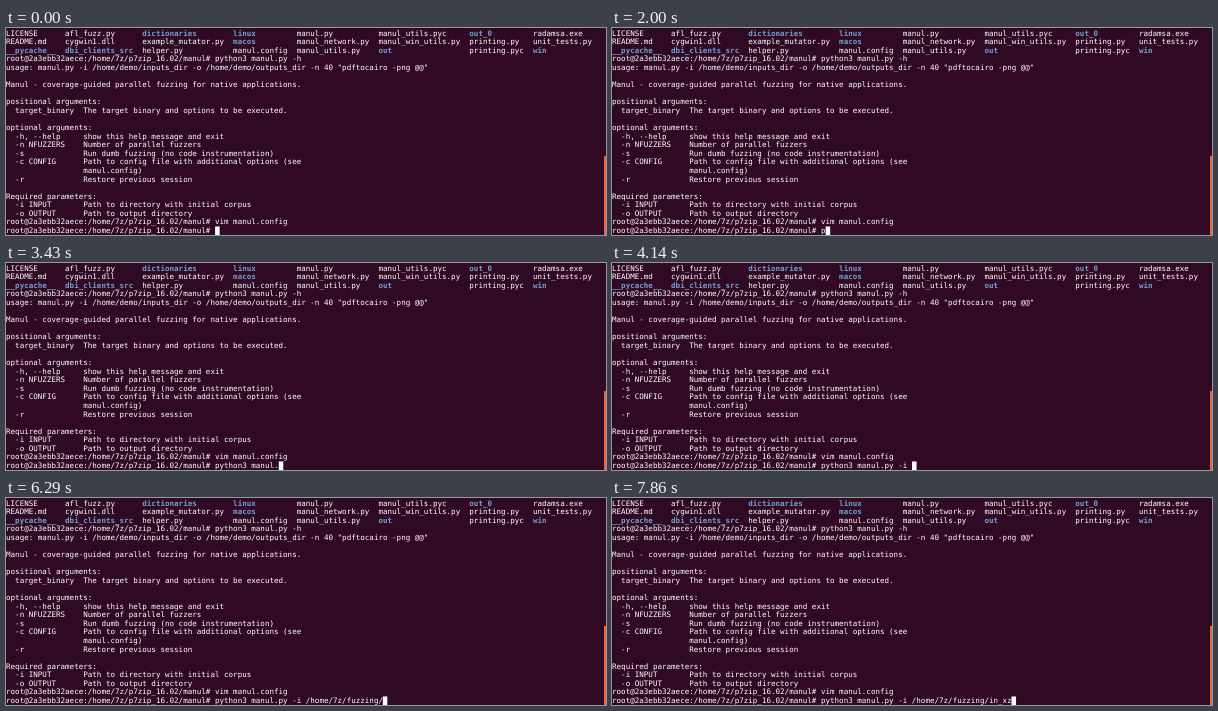
An HTML page for the animation above (8 s loop, 600x207 px).

```html
<!DOCTYPE html>
<html lang="en">
<head>
<meta charset="utf-8">
<title>Terminal session</title>
<style>
  html, body { margin: 0; width: 100%; height: 100%; overflow: hidden; background: #300a24; }
  #stage { position: relative; width: 600px; height: 207px; overflow: hidden; background: #300a24; }
  /* A 132-column terminal with 9x17 cells, scaled down to the stage */
  #screen {
    position: absolute; left: 0; top: 0.5px; margin: 0; width: 1188px;
    font: 14.949px/17px "DejaVu Sans Mono", monospace;
    font-variant-ligatures: none; text-rendering: geometricPrecision;
    color: #fff; white-space: pre;
    transform: scale(calc(600 / 1188)); transform-origin: 0 0;
  }
  #screen b { color: #729fcf; }
  #cursor { display: inline-block; width: 9px; height: 17px; vertical-align: top; background: #fff; }
  #scrollbar { position: absolute; left: 598px; top: 128px; width: 2px; height: 79px; background: #e8663c; }
</style>
</head>
<body>
<div id="stage">
<pre id="screen">LICENSE      afl_fuzz.py      <b>dictionaries</b>        <b>linux</b>         manul.py          manul_utils.pyc     <b>out_0</b>         radamsa.exe
README.md    cygwin1.dll      example_mutator.py  <b>macos</b>         manul_network.py  manul_win_utils.py  printing.py   unit_tests.py
<b>__pycache__</b>  <b>dbi_clients_src</b>  helper.py           manul.config  manul_utils.py    <b>out</b>                 printing.pyc  <b>win</b>
root@2a3ebb32aece:/home/7z/p7zip_16.02/manul# python3 manul.py -h
usage: manul.py -i /home/demo/inputs_dir -o /home/demo/outputs_dir -n 40 "pdftocairo -png @@"

Manul - coverage-guided parallel fuzzing for native applications.

positional arguments:
  target_binary  The target binary and options to be executed.

optional arguments:
  -h, --help     show this help message and exit
  -n NFUZZERS    Number of parallel fuzzers
  -s             Run dumb fuzzing (no code instrumentation)
  -c CONFIG      Path to config file with additional options (see
                 manul.config)
  -r             Restore previous session

Required parameters:
  -i INPUT       Path to directory with initial corpus
  -o OUTPUT      Path to output directory
root@2a3ebb32aece:/home/7z/p7zip_16.02/manul# vim manul.config
root@2a3ebb32aece:/home/7z/p7zip_16.02/manul# <span id="typed"></span><span id="cursor"></span></pre>
<div id="scrollbar"></div>
</div>
<script>
  const LOOP = 8000;
  const BLINK = 570;

  // Bursts of typing: text, time of first key, time of last key
  const bursts = [
    ["python3 m", 2000, 2700],
    ["anul.py -i ", 2850, 4100],
    ["/home/", 4280, 4640],
    ["7z/fuzzing/", 5420, 6280],
    ["in_xz", 6570, 7700],
  ];
  const keys = bursts.flatMap(([text, first, last]) =>
    [...text].map((char, i) => ({ char, time: first + (last - first) * i / (text.length - 1) })));

  const typed = document.getElementById("typed");
  const cursor = document.getElementById("cursor");

  function draw(now) {
    const t = now % LOOP;
    const pressed = keys.filter(key => key.time <= t);
    // The blink restarts with every key press
    const lastKey = pressed.length ? pressed[pressed.length - 1].time : -320;
    const text = pressed.map(key => key.char).join("");
    if (typed.textContent !== text) typed.textContent = text;
    cursor.style.visibility = Math.floor((t - lastKey) / BLINK) % 2 ? "hidden" : "visible";
    requestAnimationFrame(draw);
  }

  const start = performance.now();
  const tick = () => draw(Math.max(0, performance.now() - start));
  tick();
</script>
</body>
</html>
```
